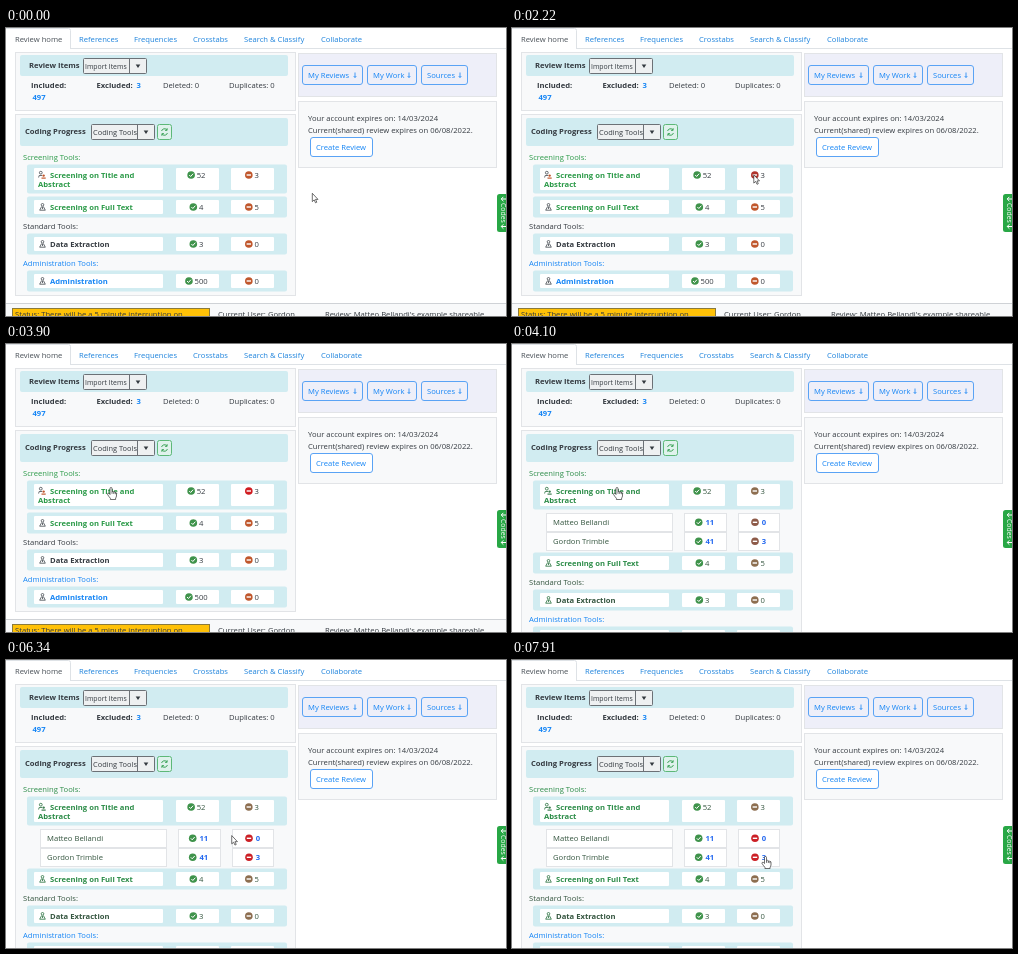
An HTML page for the animation above (8000 ms loop, 500 by 288 pixels).

```html
<!DOCTYPE html>
<html lang="en">
<head>
<meta charset="utf-8">
<title>Review home</title>
<style>
  html, body { margin: 0; width: 100%; height: 100%; overflow: hidden; background: #fff; }
  svg { display: block; width: 500px; height: 288px; }
  text { font-family: "Open Sans", "Noto Sans", sans-serif; font-size: 7.65px; white-space: pre; }
  .bold { font-weight: 700; }
  .small { font-size: 6.9px; }
  .medium { font-size: 7.4px; }
  .tip { font-size: 5.7px; }
</style>
</head>
<body>
<svg id="stage" viewBox="0 0 500 288"></svg>
<script>
const LOOP = 8000, OPEN_AT = 4100;
const INK = '#343a40', BLUE = '#1585f5', GREEN = '#2b9a48', CYAN = '#d1ecf1',
      PANEL = '#f8f9fa', EDGE = '#e2e4e7', LILAC = '#eeeff9';
const stage = document.getElementById('stage');

const text = (x, y, s, fill = INK, cls = '') =>
  `<text x="${x}" y="${y}" fill="${fill}" class="${cls}">${s}</text>`;
const bold = (x, y, s, fill) => text(x, y, s, fill, 'bold');

function box(x, y, w, h, fill, stroke, r = 0) {
  const d = stroke ? .5 : 0;
  return `<rect x="${x + d}" y="${y + d}" width="${w - 2 * d}" height="${h - 2 * d}" rx="${r}" fill="${fill}" stroke="${stroke || 'none'}"/>`;
}

const line = (d, color, width = 1) =>
  `<path d="${d}" fill="none" stroke="${color}" stroke-width="${width}"/>`;

const check = (x, y) => `<circle cx="${x}" cy="${y}" r="3.8" fill="#3f934b"/>` +
  line(`M${x - 1.9} ${y}l1.4 1.5l2.5-2.8`, '#fff', 1);
const stop = (x, y, fill) => `<circle cx="${x}" cy="${y}" r="3.8" style="fill:${fill}"/>` +
  line(`M${x - 2.2} ${y}h4.4`, '#fff', 1.4);

const person = (x, y, color) =>
  `<circle cx="${x}" cy="${y - 2.2}" r="1.3" fill="none" stroke="${color}" stroke-width=".9"/>` +
  line(`M${x - .8} ${y - .6}L${x - 2.8} ${y + 3.2}H${x + 2.8}L${x + .8} ${y - .6}M${x} ${y}v2`, color, .9);
const pair = (x, y, color, accent) =>
  `<circle cx="${x - 1.2}" cy="${y - 2.3}" r="1.4" fill="none" stroke="${color}" stroke-width=".9"/>` +
  line(`M${x - 3.4} ${y + 2.5}l.6-2h2.8`, color, .9) +
  `<circle cx="${x + 1.6}" cy="${y + .6}" r="1.2" fill="${accent}"/>` +
  line(`M${x - .5} ${y + 3.1}h4.2`, accent, 1.2);

const button = (x, y, w, label, fill, arrow) =>
  box(x, y, w, 20, fill, '#5aa3f5', 2.5) + text(x + 6, y + 12.7, label, BLUE) +
  (arrow ? line(`M${x + w - 8} ${y + 7.5}v5m-1.3-1.4l1.3 1.4l1.3-1.4`, BLUE, .8) : '');

const dropdown = (x, y, label, cls) =>
  box(x, y, 64, 16, '#eef0f1', '#6c7176', 1) + line(`M${x + 46.5} ${y}v16`, '#6c7176') +
  text(x + 2, y + 10.7, label, INK, cls) +
  `<path d="M${x + 52.7} ${y + 6.5}h4.6l-2.3 3.6z" fill="${INK}"/>`;

// An icon and its number, centred together on x.
function count(x, y, n, icon, ink, fill) {
  const left = x - (10 + 4.37 * String(n).length) / 2;
  return icon(left + 4, y, fill) + text(left + 9.6, y + 2.7, n, ink);
}

function toolRow(y, h, lines, color, done, pending, icon, stopFill, ink) {
  const mid = y + 10.5, boxes = [[28, 129], [170, 43], [225, 43]];
  return box(21, y, 260, h, CYAN, '', 2) +
    boxes.map(([x, w]) => box(x, y + 3.5, w, h - 7, '#fff', '', 1)).join('') +
    icon + bold(44, mid + 2.7, lines[0], color) +
    (lines[1] ? bold(32, mid + 12, lines[1], color) : '') +
    count(190.5, mid, done, check, ink) + count(246, mid, pending, stop, ink, stopFill);
}

function personRow(y, name, done, pending, ink) {
  const blue = '#2368f0';
  return [[34, 127], [172, 43], [226, 42]].map(([x, w]) => box(x, y, w, 19, '#fff', EDGE)).join('') +
    text(41, y + 12, name, ink) + check(186.7, y + 9.3) + bold(193.5, y + 12, done, blue) +
    stop(243, y + 9.3, 'var(--person)') + bold(249.7, y + 12, pending, blue);
}

function progress(open) {
  const dy = open ? 40 : 0, rust = open ? '#8d6e50' : '#c0572c', ink = open ? '#34553f' : INK;
  const green = open ? '#2c8c48' : GREEN, figure = open ? '#3c7d50' : '#555b60';
  return box(9, 86, 281, 182 + dy, PANEL, EDGE) +
    box(14, 90, 268, 28, CYAN, '', 2) + bold(19, 106.4, 'Coding Progress') +
    dropdown(85, 96, 'Coding Tools', 'medium') + box(151, 96, 15, 16, '#dff2ec', '#5db878', 2) +
    line('M155.6 103a3 3 0 0 1 5.2-1.2m.3-1.6v2.1h-2.1M161.4 105a3 3 0 0 1-5.2 1.2m-.3 1.6v-2.1h2.1', GREEN, .9) +
    text(17, 131.5, 'Screening Tools:', green) +
    toolRow(136.5, 29, ['Screening on Title and', 'Abstract'], green, 52, 3,
      pair(36, 147, figure, open ? figure : '#c0572c'), open ? rust : 'var(--first)', ink) +
    (open ? personRow(169, 'Matteo Bellandi', 11, 0, ink) + personRow(188, 'Gordon Trimble', 41, 3, ink) : '') +
    `<g transform="translate(0 ${dy})">` +
    toolRow(168.5, 21, ['Screening on Full Text'], green, 4, 5, person(36.5, 179, figure), rust, ink) +
    text(17, 200.7, 'Standard Tools:', ink) +
    toolRow(205.5, 21, ['Data Extraction'], ink, 3, 0, person(36.5, 216, figure), rust, ink) +
    text(17, 237.5, 'Administration Tools:', BLUE) +
    toolRow(242.5, 21, ['Administration'], BLUE, 500, 0, person(36.5, 253, figure), rust, ink) +
    '</g>' +
    (open ? '' : box(0, 275, 500, 13, PANEL) + box(0, 275, 500, 1, '#cfd2d6') +
      box(6, 280, 198, 14, '#ffc107', '#8a7a3c') +
      text(9, 288.9, 'Status: There will be a 5 minute interruption on') +
      text(212, 288.9, 'Current User: Gordon') +
      text(319, 288.9, "Review: Matteo Bellandi's example shareable"));
}

const tabs = [[73, 'References'], [128, 'Frequencies'], [187, 'Crosstabs'],
  [238, 'Search &amp; Classify'], [315, 'Collaborate']];
const page =
  box(0, 20, 500, 1, '#dee2e6') + '<path d="M-.5 21V.5H62.5q2 0 2 2V21" fill="#fff" stroke="#dee2e6"/>' +
  text(9, 13.7, 'Review home', '#495057') +
  tabs.map(([x, s]) => text(x, 13.7, s, '#1c82dc')).join('') +
  box(9, 24, 281, 59, PANEL, EDGE) + box(14, 27, 268, 21, CYAN, '', 2) +
  bold(23, 40.4, 'Review Items') + dropdown(77, 30, 'Import Items', 'small') +
  bold(25, 59.5, 'Included:') + bold(26.5, 72, '497', BLUE) +
  bold(90.5, 59.5, 'Excluded:') + bold(130.5, 59.5, '3', BLUE) +
  text(157, 59.5, 'Deleted: 0') + text(223, 59.5, 'Duplicates: 0') +
  box(292, 25, 199, 44, LILAC, EDGE) +
  button(296, 37, 61, 'My Reviews', LILAC, true) +
  button(361, 37, 50, 'My Work', LILAC, true) +
  button(415, 37, 47, 'Sources', LILAC, true) +
  box(292, 73, 199, 67, PANEL, EDGE) +
  text(302, 92.7, 'Your account expires on: 14/03/2024') +
  text(302, 104.5, 'Current(shared) review expires on 06/08/2022.') +
  button(304, 109, 63, 'Create Review', '#fff') +
  box(491, 166, 12, 38, '#28a745', '', 2.5) +
  [171, 198.5].map(y => line(`M500 ${y}h-4.8m2.2-2.2l-2.2 2.2l2.2 2.2`, '#fff', 1)).join('') +
  '<text transform="translate(494.7 175) rotate(90)" fill="#fff" class="small">Codes</text>';

// [shown from, until, x, y, width, label]
const title = "for 'Screening on Title and Abstract'", author = "done by 'Matteo Bellandi'";
const tips = [
  [1580, 1750, 192, 151, 181, 'Items with completed coding ' + title],
  [2500, 3450, 250, 151, 181, 'Items with incomplete coding ' + title],
  [5780, 6240, 199, 189, 146, 'Items with completed coding ' + author],
  [7180, 7730, 252, 189, 148, 'Items with incomplete coding ' + author]
];
const tooltip = ([, , x, y, w, s], i) => `<g id="tip${i}">` +
  box(x + 1, y + 1, w, 11, 'rgba(0,0,0,.18)') + box(x, y, w, 10, '#fff', '#8c8c8c') +
  text(x + 2.7, y + 7, s, '#575757', 'tip') + '</g>';

// [first step, last step, steps, x, y]
const moves = [
  [100, 640, 7, 85, 144],
  [820, 920, 2, 151, 149],
  [1010, 1300, 4, 191, 145],
  [1750, 2220, 6, 241.5, 146.5],
  [2310, 2500, 3, 246, 146],
  [3450, 3720, 4, 102.5, 139],
  [3810, 3900, 2, 105, 143.5],
  [4480, 5210, 9, 197, 176],
  [5310, 5310, 1, 198.5, 176],
  [6240, 6800, 7, 253.5, 174.5],
  [7730, 7910, 3, 253.5, 196.5]
];

function cursorAt(t) {
  let x = 306, y = 165;
  for (const [from, to, steps, x1, y1] of moves) {
    if (t < from) break;
    const gap = (to - from) / (steps - 1) || 1;
    const step = Math.min(steps, 1 + Math.floor((t - from) / gap));
    const p = 1 - (1 - step / steps) ** 2;
    x += (x1 - x) * p;
    y += (y1 - y) * p;
  }
  return [x, y];
}

const overLink = (x, y, open) =>
  (x < 157 && y > 137 && y < 162) ||
  (open && y > 172 && ((x > 198 && x < 206) || (x > 248 && x < 260)));

stage.innerHTML = page +
  `<g id="closed">${progress(false)}</g><g id="open">${progress(true)}</g>` +
  tips.map(tooltip).join('') +
  `<g id="cursor" stroke="#222" stroke-width=".65" stroke-linejoin="round" fill="#fff">
    <path id="arrow" d="M.3.3V8.6L2.2 6.9L3.5 9.8L4.8 9.2L3.5 6.4H6Z"/>
    <path id="hand" d="M-1 7V1Q-1 0 0 0T1 1V4Q2.2 3.4 2.8 4.5Q4 4 4.4 5Q5.5 4.8 5.5 6V8.5Q5.2 10 4.6 10.5V12H-.6V10.8Q-2.3 9-3.6 6.7Q-3.4 5.4-2.2 5.8ZM1 4V6.3M2.8 4.5V6.5M4.4 5V6.7"/>
  </g>`;

const byId = id => document.getElementById(id);
const show = (id, on) => byId(id).style.display = on ? '' : 'none';

function draw() {
  const t = performance.now() % LOOP, open = t >= OPEN_AT;
  show('closed', !open);
  show('open', open);
  tips.forEach(([from, to], i) => show('tip' + i, t >= from && t < to));
  stage.style.setProperty('--first', t < 2030 ? '#c0572c' : t < 2500 ? '#b0342c' : '#d01c20');
  stage.style.setProperty('--person', t < 6240 ? '#8d5a48' : '#cc2026');
  const [x, y] = cursorAt(t), link = overLink(x, y, open);
  byId('cursor').setAttribute('transform', `translate(${x} ${y})`);
  show('hand', link);
  show('arrow', !link);
  requestAnimationFrame(draw);
}
draw();
</script>
</body>
</html>
```
